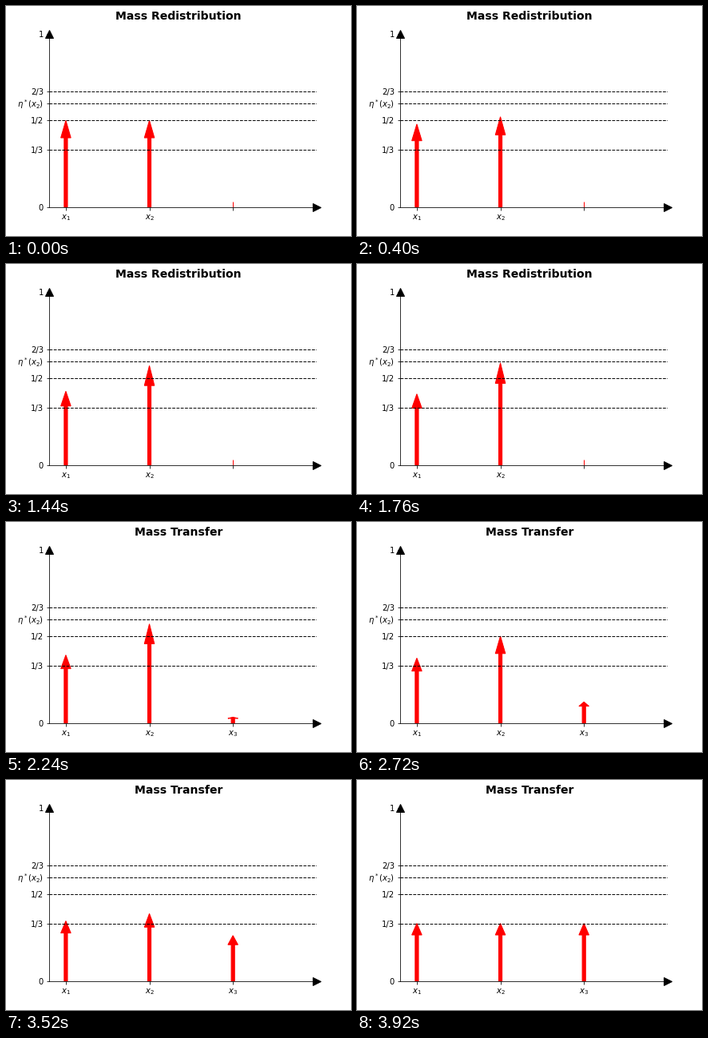
These frames come from a looping animation (432x288 px, 4000 ms). A matplotlib script:

```python
import numpy as np
import matplotlib.pyplot as plt
from matplotlib.animation import FuncAnimation
from matplotlib.patches import Polygon

plt.rcParams.update({"font.family": "DejaVu Sans", "font.size": 10})

FRAMES, INTERVAL = 50, 80
PHASE = 20                       # poses per phase
SHAFT, HEAD = 0.02, 0.06         # half widths
START = np.array([1/2, 1/2, 0])
MIDDLE = np.array([0.4, 0.6, 0])
END = np.array([1/3, 1/3, 1/3])


def arrow_points(x, height):
    neck = 0.8 * height
    return [(x - SHAFT, 0), (x - SHAFT, neck), (x - HEAD, neck), (x, height),
            (x + HEAD, neck), (x + SHAFT, neck), (x + SHAFT, 0)]


fig = plt.figure(figsize=(6, 4), dpi=72, facecolor="white")
ax = fig.add_axes([0.125, 0.125, 0.775, 0.755])
ax.set_xlim(0.8, 4)
ax.set_ylim(0, 1)
ax.spines[["top", "right"]].set_visible(False)

for level in (1/3, 1/2, 0.6, 2/3):
    ax.axhline(level, color="k", lw=1, ls="--")
ax.set_yticks([0, 1/3, 1/2, 0.6, 2/3, 1],
              ["0", "1/3", "1/2", r"$\eta^*(x_2)$", "2/3", "1"])
ax.set_xticks([1, 2, 3], ["$x_1$", "$x_2$", "$x_3$"])
last_label = ax.get_xticklabels()[2]

# Axis arrowheads
for x, y, marker in ((1, 0, ">"), (0, 1, "^")):
    ax.plot(x, y, marker=marker, color="k", ms=10,
            transform=ax.transAxes, clip_on=False)

title = fig.suptitle("", fontsize=14, fontweight="bold")
arrows = [ax.add_patch(Polygon(arrow_points(x, 0.5), closed=True, fc="red", ec="red", lw=1))
          for x in (1, 2, 3)]
stub, = ax.plot([3, 3], [0, 0.033], color="red", lw=1, solid_capstyle="butt")


def update(frame):
    # Every fifth frame holds the previous pose.
    pose = frame - (frame + 4) // 5
    transfer = pose >= PHASE
    t = (pose % PHASE) / (PHASE - 1)
    a, b = (MIDDLE, END) if transfer else (START, MIDDLE)
    heights = a + (b - a) * t
    for x, (arrow, height) in enumerate(zip(arrows, heights), 1):
        arrow.set_xy(arrow_points(x, height))
        arrow.set_visible(height > 0)
    stub.set_visible(heights[2] == 0)
    last_label.set_visible(transfer)
    title.set_text("Mass Transfer" if transfer else "Mass Redistribution")
    return [*arrows, stub, last_label, title]


anim = FuncAnimation(fig, update, frames=FRAMES, interval=INTERVAL,
                     repeat=True, repeat_delay=0, blit=False)
plt.show()
```
